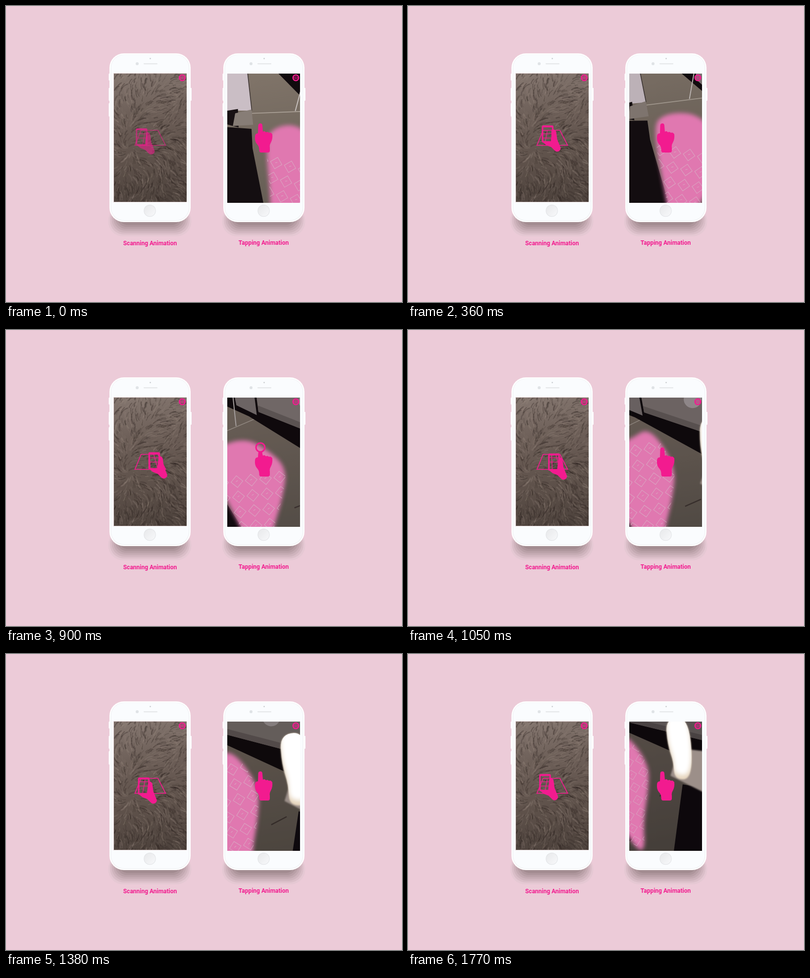
Animation, 800 px wide and 600 px high, one loop 1800 ms. Source, as an HTML page with a canvas:

```html
<!DOCTYPE html>
<html lang="en">
<head>
<meta charset="utf-8">
<title>Scanning and Tapping</title>
<style>
html, body { margin: 0; width: 100%; height: 100%; overflow: hidden; background: #eccbd8; }
canvas { display: block; width: 800px; height: 600px; }
</style>
</head>
<body>
<canvas id="stage" width="800" height="600"></canvas>
<script>
const ctx = document.getElementById('stage').getContext('2d');
const PINK = '#f21b8f', LOOP = 1800;

// ---------- helpers ----------
const clamp = v => Math.min(1, Math.max(0, v));
const ease = (a, b, t) => { const k = clamp((t - a) / (b - a)); return k * k * (3 - 2 * k); };

function poly(fill, ...p) {
  ctx.beginPath();
  for (let i = 0; i < p.length; i += 2) ctx.lineTo(p[i], p[i + 1]);
  ctx.closePath();
  ctx.fillStyle = fill;
  ctx.fill();
}

function line(color, w, x1, y1, x2, y2) {
  ctx.beginPath();
  ctx.moveTo(x1, y1);
  ctx.lineTo(x2, y2);
  ctx.strokeStyle = color;
  ctx.lineWidth = w;
  ctx.stroke();
}

// closed curve that rounds off every corner
function blob(...p) {
  const n = p.length / 2, x = i => p[(i % n) * 2], y = i => p[(i % n) * 2 + 1];
  const path = new Path2D();
  for (let i = 0; i <= n; i++) {
    const mx = (x(i) + x(i + 1)) / 2, my = (y(i) + y(i + 1)) / 2;
    if (i) path.quadraticCurveTo(x(i), y(i), mx, my);
    else path.moveTo(mx, my);
  }
  return path;
}

function disc(x, y, r, fill) {
  ctx.beginPath();
  ctx.arc(x, y, r, 0, 7);
  ctx.fillStyle = fill;
  ctx.fill();
}

function ring(x, y, r, w) {
  ctx.beginPath();
  ctx.arc(x, y, r, 0, 7);
  ctx.strokeStyle = PINK;
  ctx.lineWidth = w;
  ctx.stroke();
}

function round(x, y, w, h, r, fill) {
  ctx.beginPath();
  ctx.roundRect(x, y, w, h, r);
  ctx.fillStyle = fill;
  ctx.fill();
}

// ---------- phone body ----------
function phone(x) {
  for (let i = 0; i < 7; i++) {
    const rx = 84 - i * 3.6, c = v => v - i * 11;
    round(x + 81.5 - rx, 405, rx * 2, 62 - i * 3.8, 30 - i * 2, `rgb(${c(229)},${c(200) + i},${c(211)})`);
  }
  for (const [y, h] of [[137, 14], [166, 26], [197, 27]]) round(x - 1.5, y, 5, h, 1, '#fafbfd');
  round(x + 161, 166, 5, 26, 1, '#fafbfd');
  round(x, 96, 164, 342, 29, '#ffffff');
  round(x + 2.5, 98.5, 159, 337, 27, '#eceff2');
  round(x + 3.5, 99, 157, 335.5, 26, '#fafcfe');
  disc(x + 56, 117, 3, '#e0e3e6');
  disc(x + 82.5, 106.5, 1.3, '#c6c9cd');
  round(x + 69, 116, 28, 2.2, 1, '#e6e8ea');
  const g = ctx.createLinearGradient(x + 72, 406, x + 91, 424);
  g.addColorStop(0, '#e9eaec');
  g.addColorStop(1, '#f6f7f9');
  disc(x + 81.5, 415, 12.2, '#e1e3e6');
  disc(x + 81.5, 415, 11.2, g);
}

function eye(x, y) {
  ring(x, y, 5.7, 2.5);
  ctx.lineWidth = 1.2;
  ctx.beginPath();
  ctx.moveTo(x - 4, y);
  ctx.quadraticCurveTo(x, y - 5, x + 4, y);
  ctx.quadraticCurveTo(x, y + 5, x - 4, y);
  ctx.stroke();
  disc(x, y, 1.1, PINK);
}

// ---------- left screen ----------
function makeFur() {
  const c = document.createElement('canvas');
  c.width = 147;
  c.height = 260;
  const f = c.getContext('2d');
  const g = f.createLinearGradient(10, 0, 50, 260);
  ['#84766f', '#6c5e57', '#5f524b', '#4e433d'].forEach((s, i) => g.addColorStop(i / 3, s));
  f.fillStyle = g;
  f.fillRect(0, 0, 147, 260);
  let seed = 7;
  const rnd = () => (seed = seed * 16807 % 2147483647) / 2147483647;
  f.filter = 'blur(0.7px)';
  f.lineCap = 'round';
  for (let i = 0; i < 1100; i++) {
    const x = rnd() * 147, y = rnd() * 260, len = 5 + rnd() * 11;
    const a = Math.atan2(y - 150, x - 30) + 0.6 * Math.sin(x / 17 + y / 23) + (rnd() - 0.5) * 0.6;
    f.strokeStyle = i % 2 ? `rgba(38,29,26,${0.14 + rnd() * 0.2})`
                          : `rgba(158,142,132,${0.08 + rnd() * 0.18})`;
    f.lineWidth = 1 + rnd() * 2;
    f.beginPath();
    f.moveTo(x, y);
    f.quadraticCurveTo(x + Math.cos(a) * len * 0.6, y + Math.sin(a) * len * 0.6,
      x + Math.cos(a + 0.3) * len, y + Math.sin(a + 0.3) * len);
    f.stroke();
  }
  return c;
}
const fur = makeFur();
const GRIP = new Path2D('M24 8Q29 9 29.5 16L31 28L37 43Q40 48 35 52Q30 55 26 51' +
  'L19 44L9 40L3 35L18 33L20 16Q20 9 24 8Z');

function scanIcon(t) {
  const a = (t - 65) / 1530 * 2 * Math.PI;
  const x = 275 - 13.2 * Math.cos(a), y = 246.5 - 4.8 * Math.sin(a);
  ctx.save();
  ctx.globalAlpha = clamp(0.55 + t / 270);
  ctx.strokeStyle = PINK;
  ctx.lineWidth = 1.7;
  ctx.beginPath();
  ctx.moveTo(273, 252);
  ctx.lineTo(307, 252);
  ctx.lineTo(322.5, 282.5);
  ctx.lineTo(260.5, 282.5);
  ctx.closePath();
  ctx.stroke();

  // floor grid shows only through the little phone
  ctx.save();
  ctx.beginPath();
  ctx.rect(x + 1, y + 1, 21, 33);
  ctx.clip();
  for (let i = 1; i < 4; i++) line(PINK, 1.3, 273 + i * 8.5, 252, 260.5 + i * 15.5, 282.5);
  for (const d of [3, 6.5]) line(PINK, 1.3, 273 - d, 252 + d * 2.4, 307 + d, 252 + d * 2.4);
  ctx.restore();

  ctx.lineWidth = 3;
  ctx.beginPath();
  ctx.roundRect(x + 1.5, y + 1.5, 20.5, 32, 1.5);
  ctx.stroke();
  ctx.fillStyle = PINK;
  ctx.fillRect(x + 1, y + 1, 21, 3);
  ctx.translate(x, y);
  ctx.fill(GRIP);
  ctx.restore();
}

// ---------- right screen: one flat room seen by a panning camera ----------
// time, then place, turn (degrees) and scale of the sofa corner, the room's origin
const CAMERA = [
  [0, 637, 202, 15, 1], [360, 620, 173, 10, 1], [630, 561, 167, 0, 1], [900, 510, 166, -6, 1],
  [1050, 477, 167, -9, 1], [1380, 440, 162, -13, 1], [1770, 424, 133, -14, 0.85]];

function camera(t) {
  let i = 0;
  while (i < CAMERA.length - 2 && t > CAMERA[i + 1][0]) i++;
  const [a, b] = [CAMERA[i], CAMERA[i + 1]], k = (t - a[0]) / (b[0] - a[0]);
  const [, x, y, turn, zoom] = a.map((v, j) => v + (b[j] - v) * k);
  ctx.translate(x, y);
  ctx.rotate(turn * Math.PI / 180);
  ctx.scale(zoom, zoom);
}

function furniture() {
  line('#aca298', 1.6, -240, 85, -1, 11);
  ctx.filter = 'blur(0.7px)';
  poly('#110b0e', -110, -46, -20, 7, 105, 104, 270, 205, 270, -300, -110, -300);
  poly('#827a79', -43, -18, -4, 6, -6, -90, -50, -90);
  poly('#877e7b', 0, 0, -4, -150, 270, -150, 270, 142);
  poly('#6e6563', 0, 0, 0, -13, 270, 128, 270, 142);
  disc(101, -11, 18, '#b3aaab');
  line('#c6bfbc', 2, -48, 24, -48, -80);
  poly('#140e11', -124, 82, -112, 119, -30, 286, -300, 320, -300, 115);
  poly('#cabec5', -133, 46, -190, -100, -300, -90, -260, 80);
  line('#3f3735', 1.6, -133, 46, -190, -100);
  poly('#181113', -181, 59, -161, 50, -150, 86, -174, 86);
  poly('#877d76', -162, 86, -164, 60, -134, 44, -123, 73);
  line('#453b37', 2.5, 52, 201, 86, 192);
  poly('#110b10', 112, 187, 200, 225, 300, 400, 40, 370);
}

function scanned(t) {
  const gap = 18 * clamp(1 - t / 360), grow = ease(900, 1050, t);
  const area = blob(-112 + gap, 92, -92 + gap, 62, -36, 50, 4 + grow * 3, 72 - grow * 42,
    46, 118, 30, 180, 0, 250, -12, 315, -30, 315, -59 + gap, 232);
  ctx.filter = 'blur(4px)';
  ctx.fillStyle = '#e078b0';
  ctx.fill(area);
  ctx.filter = 'none';

  ctx.save();
  ctx.clip(area);
  ctx.strokeStyle = 'rgba(215,182,199,0.75)';
  ctx.lineWidth = 1;
  ctx.beginPath();
  for (let i = -2; i < 5; i++) for (let j = -1 - 2 * grow; j < 5; j++) {
    const u = i * 29 - 58, v = j * 31 + 167, r = 12;
    ctx.moveTo(u, v - r);
    ctx.lineTo(u + r, v);
    ctx.lineTo(u, v + r);
    ctx.lineTo(u - r, v);
    ctx.closePath();
    ctx.moveTo(u - 2, v);
    ctx.lineTo(u + 2, v - 2);
  }
  ctx.stroke();
  ctx.restore();
}

function lamp() {
  ctx.filter = 'blur(1.5px)';
  poly('#9c8f89', 123, 101, 190, 126, 160, 221, 89, 160);
  const shape = blob(110, 25, 166, 35, 140, 180, 96, 172, 104, 130, 100, 88);
  ctx.fillStyle = '#e6d5bd';
  ctx.fill(shape);
  ctx.clip(shape);
  ctx.translate(2, -10);
  ctx.filter = 'blur(5px)';
  ctx.fillStyle = '#ffffff';
  ctx.fill(shape);
}

function room(t) {
  ctx.save();
  ctx.beginPath();
  ctx.rect(447, 137, 147, 262);
  ctx.clip();
  const g = ctx.createLinearGradient(500, 150, 540, 399);
  g.addColorStop(0, '#7f7368');
  g.addColorStop(1, '#665e55');
  ctx.fillStyle = g;
  ctx.fillRect(447, 137, 147, 262);

  ctx.save();
  camera(t);
  furniture();
  ctx.restore();
  // the room gets darker along the way
  ctx.fillStyle = `rgba(8,4,6,${0.36 * t / LOOP})`;
  ctx.fillRect(447, 137, 147, 262);
  camera(t);
  scanned(t);
  lamp();
  ctx.restore();
}

function tapIcon(t) {
  const press = ease(510, 780, t) * (1 - ease(930, 1040, t)), top = 238 + 8 * press;
  ctx.fillStyle = PINK;
  ctx.fill(new Path2D(`M509 258L509.5 ${top + 5}Q509.5 ${top} 514 ${top}Q518 ${top} 518 ${top + 5}` +
    'L519 255Q522 252 525 256Q529 254 531 257Q535 255 538 260Q539 270 535 277' +
    'Q532 282 533 287L533 293Q533 297 529 297L515 297Q511 297 511.5 290' +
    'Q511 284 507 280Q502 274 503 265Q503 258 509 258Z'));
  const k = ease(750, 880, t);
  ctx.globalAlpha = k * (1 - ease(930, 1030, t));
  ring(514, 238, 3 + 6 * k, 3);
  ctx.globalAlpha = 1;
}

function label(text, x, y) {
  ctx.font = '700 12px Roboto, sans-serif';
  ctx.textAlign = 'center';
  ctx.fillStyle = PINK;
  ctx.fillText(text, x, y);
}

function draw(t) {
  ctx.fillStyle = '#eccbd8';
  ctx.fillRect(0, 0, 800, 600);
  phone(209);
  phone(439);

  ctx.fillStyle = '#e2d5d6';
  ctx.fillRect(217, 136, 148, 262);
  ctx.drawImage(fur, 218, 137);
  eye(356, 145.5);
  scanIcon(t);

  room(t);
  eye(585.5, 145.5);
  tapIcon(t);

  label('Scanning Animation', 291, 485);
  label('Tapping Animation', 520.5, 484);
}

const start = performance.now();
function frame() {
  const t = (performance.now() - start) % LOOP;
  draw(t < 60 ? 0 : Math.floor(t / 30) * 30);
  requestAnimationFrame(frame);
}
frame();
</script>
</body>
</html>
```
